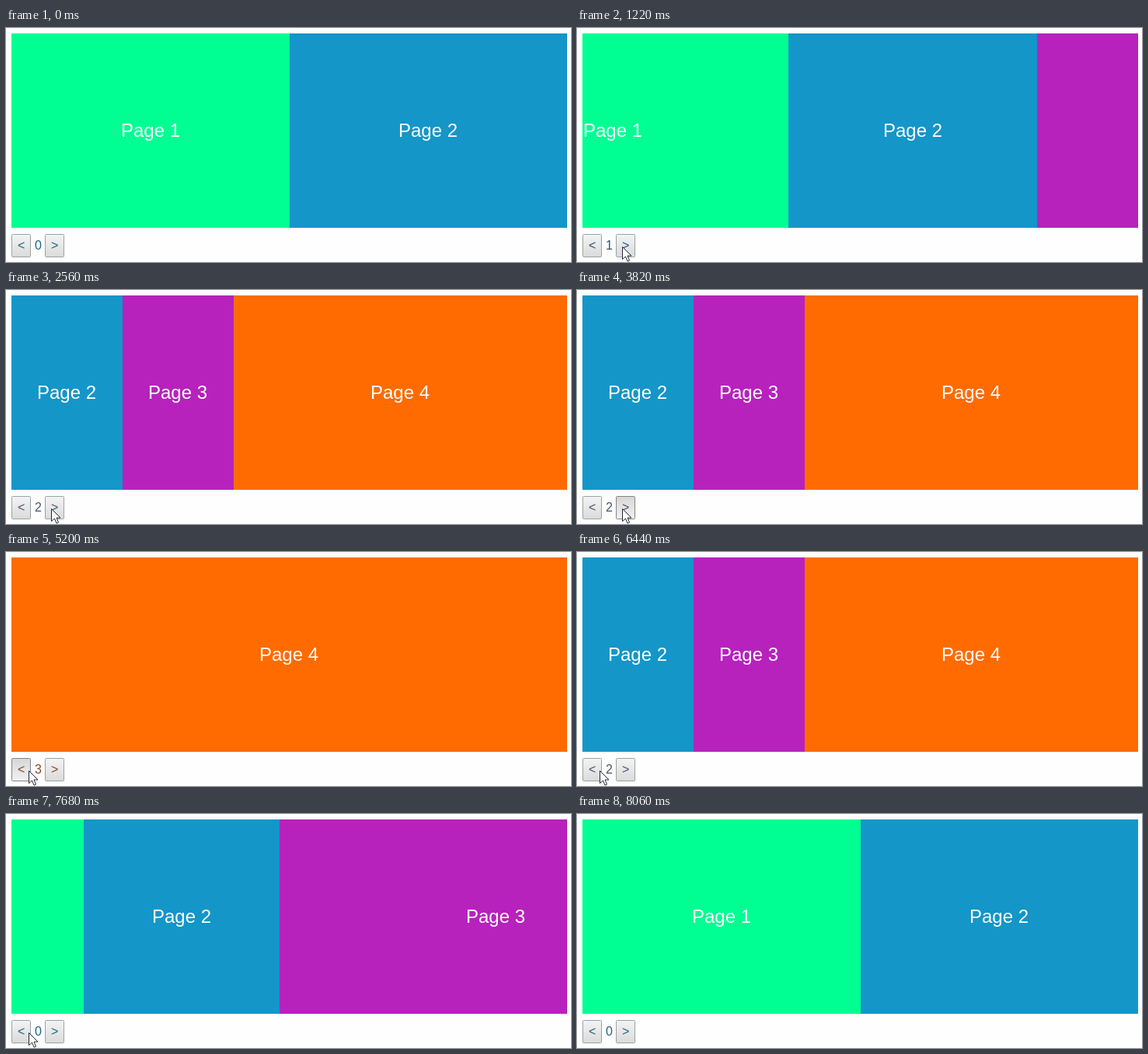
These frames come from a looping animation (727 by 301 pixels, 9.3 s). An HTML page with a canvas:

```html
<!DOCTYPE html>
<html lang="en">
<head>
<meta charset="utf-8">
<title>Sliding pages</title>
<style>
html, body { margin: 0; width: 100%; height: 100%; overflow: hidden; background: #fefefe; }
canvas { display: block; }
</style>
</head>
<body>
<canvas id="stage" width="727" height="301"></canvas>
<script>
const ctx = document.getElementById('stage').getContext('2d');
const LOOP = 9300;
const HOLD = 150;            // button stays down this long before a slide
const SLIDE = 200, LEAD = 52; // a slide's first visible step is LEAD into it
const STEP = 80;             // slides advance in visible steps
const VIEW = { x: 7, y: 7, w: 715, h: 250 };
const FONT = '"Liberation Sans", Arial, sans-serif';
const PAGE_COLORS = ['#00ff92', '#1496c8', '#b722bd', '#ff6b00'];

// First visible page and the widths of the visible pages, per state.
const STATES = [
  { first: 0, widths: [.5, .5], ink: '#1f6482' },
  { first: 1, widths: [.3, .7], ink: '#2a527c' },
  { first: 1, widths: [.2, .2, .6], ink: '#45566a' },
  { first: 3, widths: [1], ink: '#854626' }
];
const CLICKS = [
  { time: 1220, to: 1 }, { time: 2390, to: 2 }, { time: 3960, to: 3 },
  { time: 5350, to: 2 }, { time: 6600, to: 1 }, { time: 7680, to: 0 }
];
const REST = 281, NEXT_X = 58, BACK_X = 29;
const MOVES = [
  { start: 560, end: 1070, from: [146, 303], to: [NEXT_X, REST] },
  { start: 4510, end: 4810, from: [NEXT_X, REST], to: [BACK_X, REST] },
  { start: 7830, end: 8060, from: [BACK_X, REST], to: [44, 303] }
];

const clamp = v => Math.max(0, Math.min(1, v));
const mix = (a, b, p) => a + (b - a) * p;

// Hidden pages are one view wide and queue up on either side.
function edges({ first, widths }) {
  let x = -first;
  return [x, ...PAGE_COLORS.map((_, i) => x += widths[i - first] ?? 1)];
}

function slideAt(t) {
  const n = CLICKS.filter(c => t >= c.time).length;
  if (!n) return { from: 0, to: 0, p: 1 };
  const { time, to } = CLICKS[n - 1];
  const shown = Math.floor((t - time) / STEP) * STEP + LEAD;
  return { from: n > 1 ? CLICKS[n - 2].to : 0, to, p: clamp(shown / SLIDE) };
}

function text(str, x, y, size, color) {
  ctx.font = size + 'px ' + FONT;
  ctx.fillStyle = color;
  ctx.fillText(str, Math.round(x - ctx.measureText(str).width / 2), y);
}

function drawPages({ from, to, p }) {
  const a = edges(STATES[from]), b = edges(STATES[to]);
  const xs = a.map((e, i) => VIEW.x + VIEW.w * mix(e, b[i], p));
  ctx.save();
  ctx.beginPath();
  ctx.rect(VIEW.x, VIEW.y, VIEW.w, VIEW.h);
  ctx.clip();
  PAGE_COLORS.forEach((color, i) => {
    const left = Math.round(xs[i]), right = Math.round(xs[i + 1]);
    ctx.fillStyle = color;
    ctx.fillRect(left, VIEW.y, right - left, VIEW.h);
    text('Page ' + (i + 1), (xs[i] + xs[i + 1]) / 2, 140, 24, '#fff');
  });
  ctx.restore();
}

function drawButton(x, sign, color, pressed) {
  const fill = ctx.createLinearGradient(0, 265, 0, 295);
  fill.addColorStop(0, pressed ? '#d6d6d6' : '#f4f4f4');
  fill.addColorStop(1, pressed ? '#f2f2f2' : '#dadada');
  ctx.beginPath();
  ctx.roundRect(x + .5, 265.5, 24, 29, 1);
  ctx.fillStyle = fill;
  ctx.fill();
  ctx.strokeStyle = pressed ? '#858585' : '#98a4a4';
  ctx.stroke();
  text(sign, x + 12.5, 285, 16, color);
}

const POINTER = new Path2D('M0 0V16L4 12.5L6.5 18.5L9 17.5L6.5 11.5H11.5Z');

function drawPointer(t) {
  const { start, end, from, to } = MOVES.filter(m => t >= m.start).pop() ?? MOVES[0];
  const p = clamp((t - start) / (end - start));
  const [x, y] = from.map((v, i) => Math.round(mix(v, to[i], p)) + .5);
  ctx.save();
  ctx.translate(x, y);
  ctx.fillStyle = '#fff';
  ctx.strokeStyle = '#26263a';
  ctx.fill(POINTER);
  ctx.stroke(POINTER);
  ctx.restore();
}

function draw(t) {
  const slide = slideAt(t), { ink } = STATES[slide.to];
  const down = CLICKS.find(c => t >= c.time - HOLD && t < c.time);
  ctx.fillStyle = '#fefefe';
  ctx.fillRect(0, 0, 727, 301);
  drawPages(slide);
  drawButton(7, '<', ink, down && down.to < slide.to);
  text(String(slide.to), 41.5, 285, 16, ink);
  drawButton(50, '>', ink, down && down.to > slide.to);
  drawPointer(t);
}

const begin = performance.now();
function frame() {
  draw((performance.now() - begin) % LOOP);
  requestAnimationFrame(frame);
}
frame();
</script>
</body>
</html>
```
